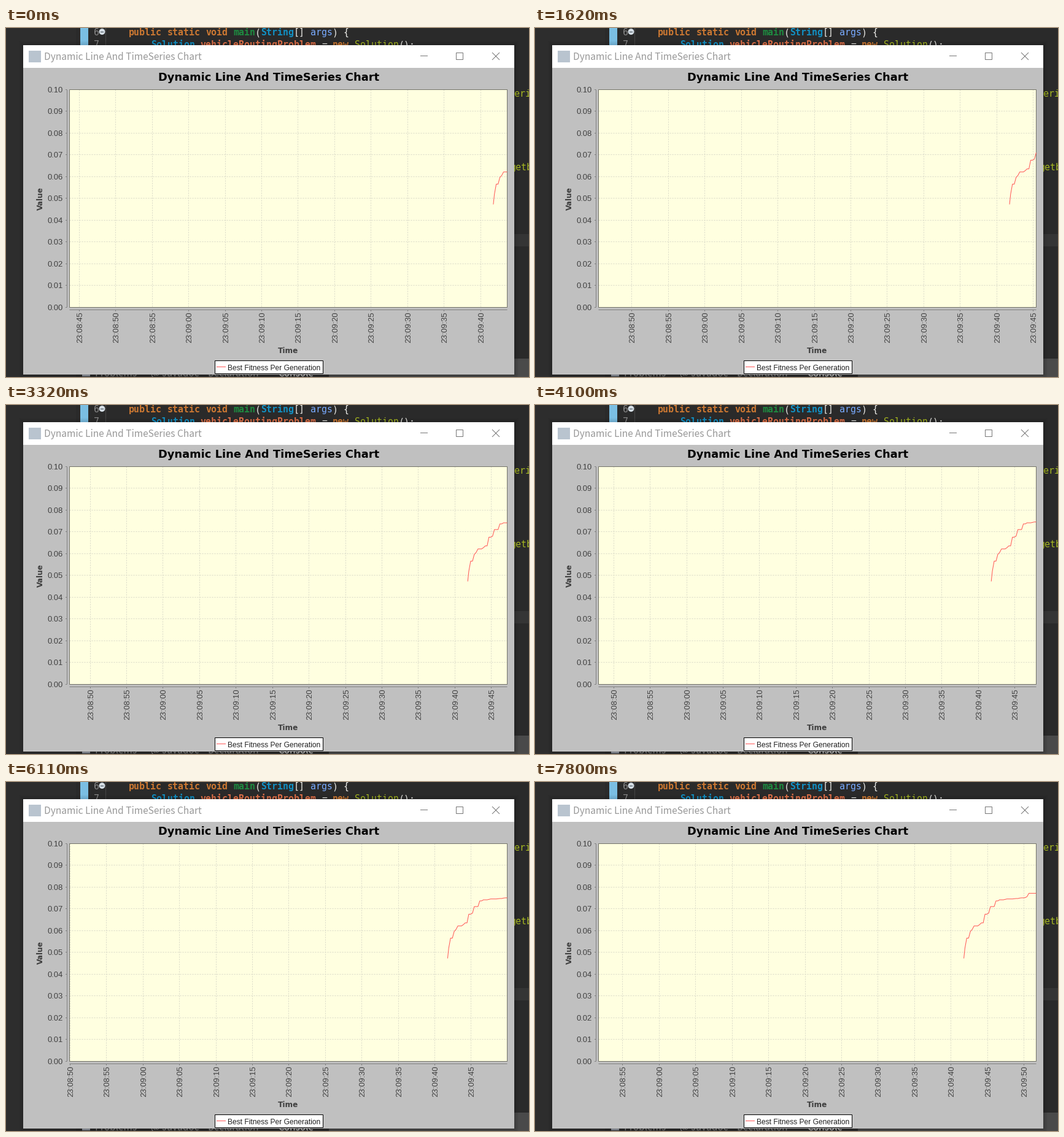
These frames come from a looping animation (852x569 px, 8000 ms). A matplotlib script:

```python
import matplotlib.pyplot as plt
import numpy as np
from matplotlib.animation import FuncAnimation
from matplotlib.patches import Circle, Rectangle

W, H, DPI = 852, 569, 64
PX = 72 / DPI                      # points per pixel
LOOP, STEP = 8000, 40              # ms

# Plot area and time axis; seconds count from 23:09:00
LEFT, RIGHT, TOP, BOTTOM = 103.5, 816.5, 100.5, 455.5
SPAN, START, SAMPLE = 60, 43.66, 0.2506
MAX_VALUE = 0.10

# Moments at which a new sample arrives: (first, count), 230 ms apart
BURSTS = [(70, 1), (380, 5), (1620, 4), (2630, 5),
          (3870, 5), (5100, 4), (6110, 5), (7340, 3)]
ARRIVALS = np.array([t + 230 * i for t, count in BURSTS for i in range(count)])

# Best fitness in units of 0.0001, one per sample
FITNESS = np.array([
    473, 520, 566, 566, 597, 606, 622, 622, 622, 628, 636, 636, 676, 676,
    681, 711, 711, 711, 737, 737, 742, 742, 742, 744, 746, 746, 746, 746,
    747, 748, 748, 750, 751, 751, 752, 757, 772, 772, 772, 772, 772]) / 1e4
HISTORY = 8                        # samples already there before the first one shown
SAMPLE_NO = np.arange(len(FITNESS)) - HISTORY
SAMPLE_TIME = START + SAMPLE * SAMPLE_NO.astype(float)
SAMPLE_TIME[0] += 0.4 * SAMPLE

SANS, BOLD, MONO, UI = ("Liberation Sans", "DejaVu Sans", "DejaVu Sans Mono",
                        "Noto Sans CJK JP")
DARK, AXIS, GRID, RED = "#404040", "#808080", "#d9d9c8", "#ff5555"

plt.rcParams["path.snap"] = False  # all coordinates are exact pixel centres
fig = plt.figure(figsize=(W / DPI, H / DPI), dpi=DPI, facecolor="#2d2d2d")
ax = fig.add_axes([0, 0, 1, 1])


def rect(x0, y0, x1, y1, color, edge="none", z=1, **kw):
    ax.add_patch(Rectangle((x0, y0), x1 - x0, y1 - y0, facecolor=color,
                           edgecolor=edge, linewidth=PX, zorder=z, **kw))


def line(xs, ys, color, z=2, **kw):
    return ax.plot(xs, ys, color=color, lw=PX, zorder=z,
                   solid_capstyle="butt", **kw)[0]


def text(x, y, s, size, color, font=SANS, z=3, **kw):
    return ax.text(x, y, s, fontsize=size * PX, color=color, family=font,
                   zorder=z, va="baseline", rotation_mode="anchor", **kw)


def code(x, y, words):
    for col, word, color, weight in words:
        text(x + 8.97 * col, y, word, 14.9, color, MONO, 0, weight=weight)


def draw_editor():
    rect(114, 0, W, H, "#2a2a2a", z=0)
    i, j = np.indices((28, 13))
    checker = np.where(((i + j) % 2)[..., None], [40, 155, 215], [205, 225, 238])
    ax.imshow(checker.astype(np.uint8), extent=(121, 134, 28, 0), aspect="auto",
              interpolation="nearest", zorder=0)
    line([162.5, 162.5], [0, 28], "#454545", 0)
    for y, number in ((12, "6"), (32, "7")):
        text(143, y, number, 14.9, "#858585", MONO, 0)
    ax.add_patch(Circle((156.5, 6), 4.5, color="#d4dde4", zorder=0))
    line([154, 159], [6.5, 6.5], "#3a4650", 0)

    orange, blue, white, lime = "#cc7832", "#1290c3", "#e8e8e4", "#a7b821"
    code(200, 12, [
        (0, "public", orange, "bold"), (7, "static", orange, "bold"),
        (14, "void", orange, "bold"), (19, "main", "#1e8a40", "bold"),
        (23, "(", white, "normal"), (24, "String", blue, "bold"),
        (30, "[]", white, "normal"), (33, "args", "#79abff", "normal"),
        (37, ")", white, "normal"), (39, "{", white, "normal")])
    code(236, 32, [
        (0, "Solution", blue, "bold"),
        (9, "vehicleRoutingProblem", "#e0704a", "bold"),
        (31, "=", white, "normal"), (33, "new", orange, "bold"),
        (37, "Solution", lime, "normal"), (45, "();", white, "normal")])

    rect(828, 336, W, 356, "#353535", z=0)
    code(819, 112, [(0, "Seri", lime, "normal")])
    code(821, 232, [(0, "getb", lime, "normal")])

    rect(526, 539, W, H, "#4a4a4a", z=0)
    rect(124, 563, 137, 568, "#8a9098", z=0)
    for x, tab, color in ((144, "Problems", "#808080"), (236, "@ Javadoc", "#808080"),
                          (328, "Declaration", "#808080"), (443, "Console", "#d0d0d0")):
        text(x, 568, tab, 15.5, color, UI, 0)
    for grow in range(1, 8):
        rect(28 - grow, 28 - grow, 828 + grow, 565 + grow, "black", z=0, alpha=0.015)


def draw_window():
    rect(28, 28, 828, 565, "#c0c0c0")
    rect(28, 28, 828, 65, "white")
    rect(37, 37, 57, 56, "#b9c4cf")
    text(62, 52, "Dynamic Line And TimeSeries Chart", 15.55, "#999999", UI)
    button = "#777777"
    line([675, 687], [45.5, 45.5], button)
    rect(733.5, 40.5, 744.5, 51.5, "none", button)
    line([792, 804], [40, 52], button)
    line([792, 804], [52, 40], button)


def draw_chart():
    text(428, 86, "Dynamic Line And TimeSeries Chart", 17.9, "black", BOLD,
         ha="center", weight="bold")
    rect(LEFT, TOP, RIGHT, BOTTOM, "#ffffe0")
    for k in range(11):
        y = np.ceil(BOTTOM - k * (BOTTOM - TOP) / 10) - 0.5
        line([LEFT, RIGHT], [y, y], GRID, linestyle=(0, (2, 2)))
        line([97, 99], [y, y], AXIS)
        text(93, y + 4.5, f"{k / 100:.2f}", 13, DARK, ha="right")
    line([99.5, 99.5], [TOP, BOTTOM], AXIS)
    line([LEFT, RIGHT], [459.5, 459.5], AXIS)
    rect(LEFT, TOP, RIGHT, BOTTOM, "none", "#74746a", z=4)
    text(60, 297, "Value", 12.1, DARK, BOLD, rotation=90, weight="bold")
    text(459.5, 530, "Time", 12.1, DARK, BOLD, ha="center", weight="bold")

    rect(340.5, 542.5, 516.5, 563.5, "white", "black")
    line([343, 358], [552.5, 552.5], RED)
    text(361, 558, "Best Fitness Per Generation", 12.05, "#202020")


draw_editor()
draw_window()
draw_chart()
ticks = [(line([], [], GRID, linestyle=(0, (2, 2))), line([], [], AXIS),
          text(0, 513, "", 13, DARK, rotation=90)) for _ in range(13)]
curve = line([], [], RED, 5)
ax.set(xlim=(0, W), ylim=(H, 0))
ax.axis("off")


def clock(second):
    total = 23 * 3600 + 9 * 60 + second
    return f"{total // 3600}:{total // 60 % 60:02d}:{total % 60:02d}"


def update(frame):
    arrived = int(np.sum(ARRIVALS < (frame + 1) * STEP))
    end = START + SAMPLE * arrived
    begin = end - SPAN

    def x_of(second):
        return LEFT + (second - begin) * (RIGHT - LEFT) / SPAN

    first = int(np.ceil(begin / 5)) * 5
    for k, (grid, mark, label) in enumerate(ticks):
        second = first + 5 * k
        x = np.floor(x_of(second)) + 0.5
        grid.set_data([x, x], [TOP, BOTTOM])
        mark.set_data([x, x], [460, 462])
        label.set_x(x + 4.8)
        label.set_text(clock(second))
        for artist in (grid, mark, label):
            artist.set_visible(second <= end)

    shown = SAMPLE_NO <= arrived
    curve.set_data(x_of(SAMPLE_TIME[shown]),
                   BOTTOM - (BOTTOM - TOP) * FITNESS[shown] / MAX_VALUE)
    return [curve]


anim = FuncAnimation(fig, update, frames=LOOP // STEP, interval=STEP,
                     repeat=True, repeat_delay=0, cache_frame_data=False)
plt.show()
```
